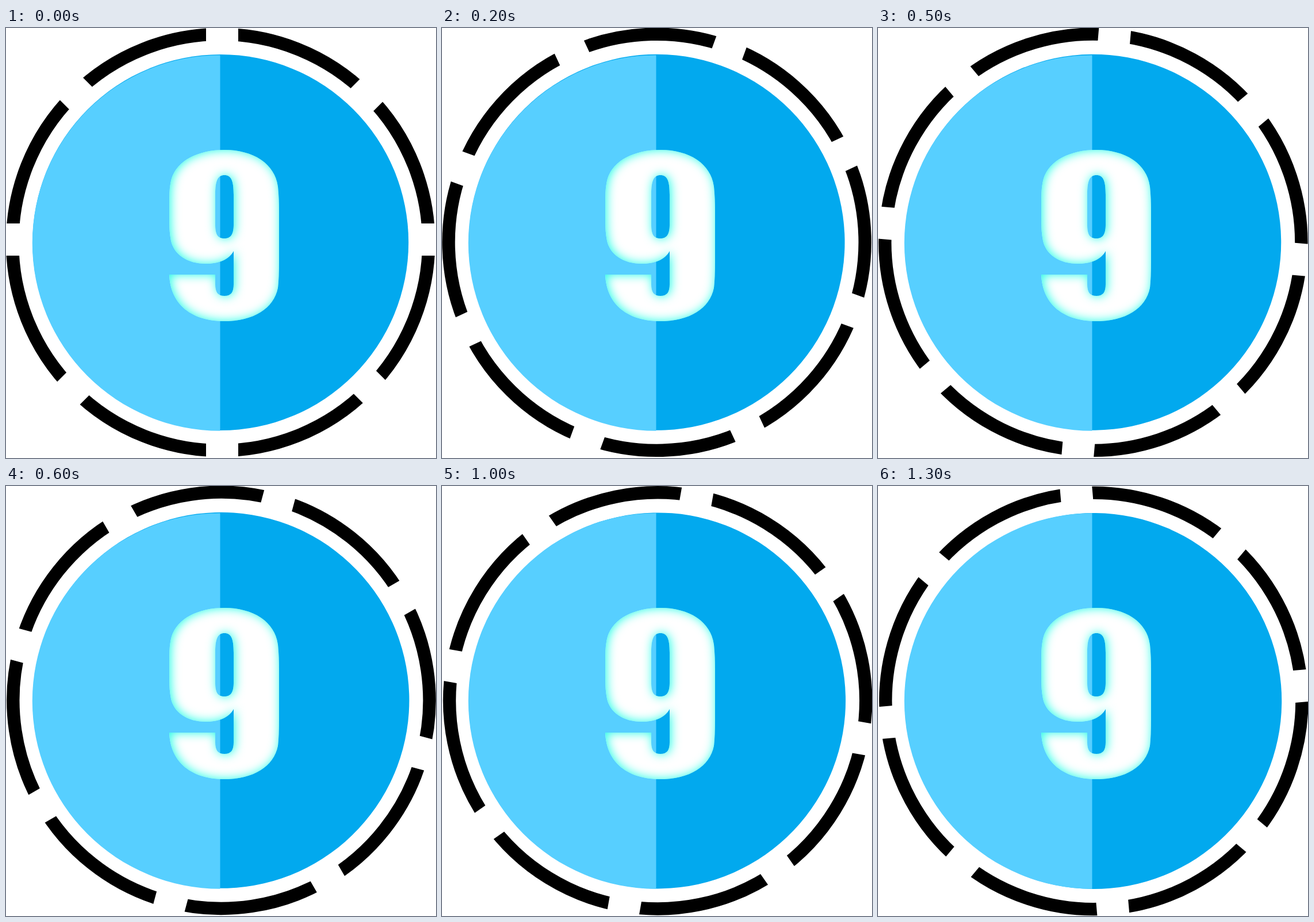
An HTML page that plays this animation: 748 by 748 pixels, repeating every 1.4 s.

```html
<!DOCTYPE html>
<html lang="en">
<head>
<meta charset="utf-8">
<title>Countdown dial</title>
<style>
  html, body { margin: 0; height: 100%; overflow: hidden; background: #fff; }
  svg { display: block; width: 100%; height: 100%; }
</style>
</head>
<body>
<svg viewBox="0 0 748 748" role="img" aria-label="9">
  <defs>
    <filter id="glow" x="-25%" y="-20%" width="150%" height="140%" color-interpolation-filters="sRGB">
      <feFlood flood-color="#20ffe6"/>
      <feComposite operator="out" in2="SourceAlpha"/>
      <feGaussianBlur stdDeviation="9"/>
      <feOffset dx="2"/>
      <feComposite operator="in" in2="SourceAlpha" result="rim"/>
      <feMerge>
        <feMergeNode in="SourceGraphic"/>
        <feMergeNode in="rim"/>
      </feMerge>
    </filter>
  </defs>

  <!-- ring cut into eight dashes by four crossing bars -->
  <g id="dial" fill="none">
    <circle cx="373.2" cy="373" r="362.1" stroke="#000" stroke-width="22.4"/>
    <path d="M376-50V800M-50 368H800M26 18l700 700M726 18l-700 700" stroke="#fff" stroke-width="56"/>
    <circle cx="373.2" cy="373" r="327" fill="#02a9ee"/>
  </g>

  <path d="M372.5 47.3A326.7 326.7 0 0 0 372.5 700.7Z" fill="#57cfff"/>

  <path filter="url(#glow)" fill="#fff" fill-rule="evenodd" d="
    M380 212C430 212 468 236 473 276Q475 295 475 320V405Q475 435 473 452C466 488 430 510 380 510
    C324 510 286 482 284 429H364V446C364 459 368 466 380 466C392 466 396 459 396 446V388
    C388 403 370 410 347 410C316 410 292 394 287 370Q284 355 284 335V300Q284 275 288 262
    C298 230 335 212 380 212Z
    M380 256C392 256 396 266 396 290V342C396 359 391 366 380 366C368 366 364 359 364 342V290
    C364 266 368 256 380 256Z"/>
</svg>
<script>
  const dial = document.getElementById("dial");
  const STEP = 100, STEPS = 14, TURN = 10;

  function draw(now) {
    const step = Math.floor(now / STEP) % STEPS;
    dial.setAttribute("transform", `rotate(${step * TURN} 374 374)`);
    requestAnimationFrame(draw);
  }
  draw(0);
</script>
</body>
</html>
```
